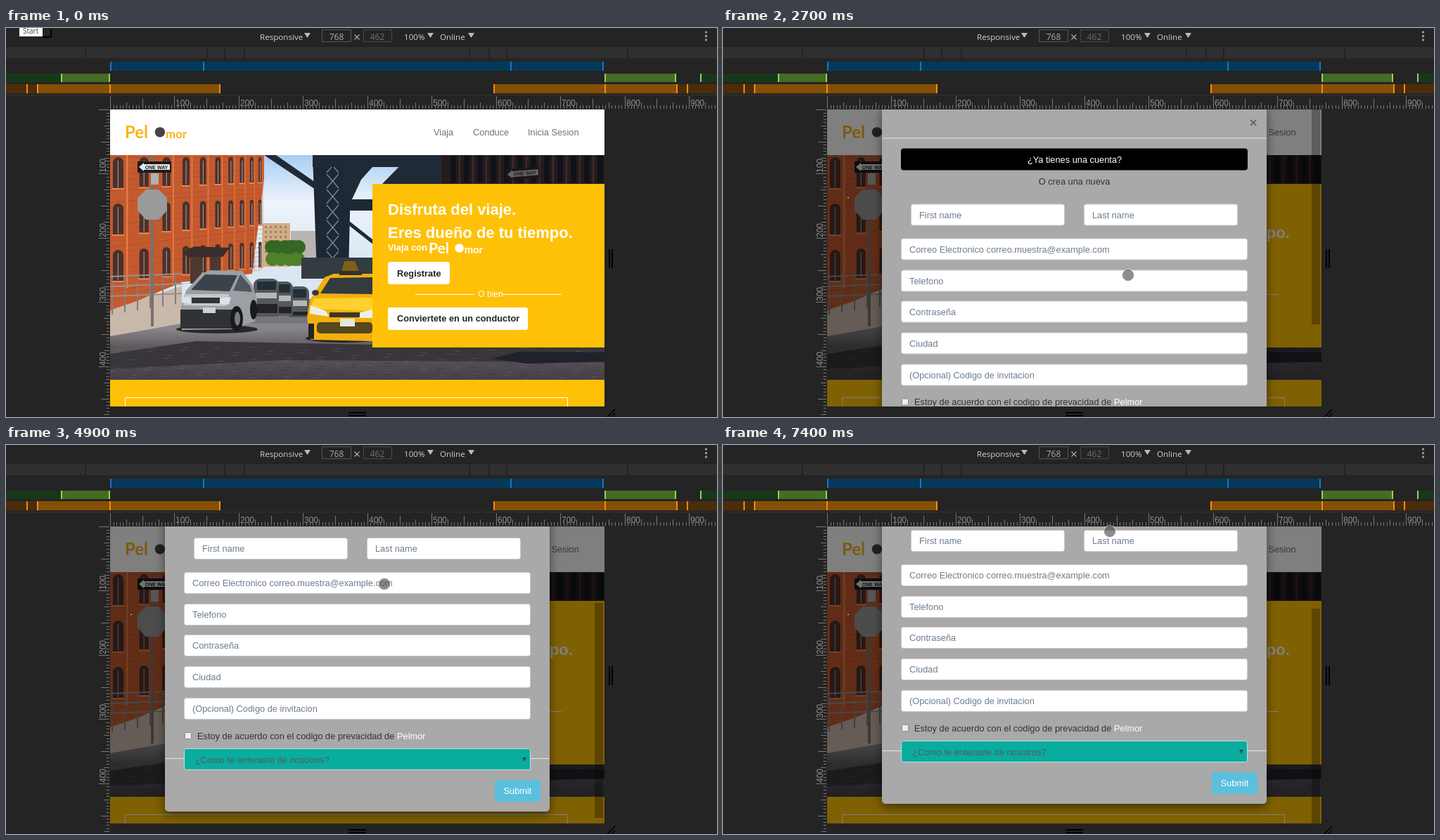
These frames come from a looping animation (1011 px wide and 554 px high, 8 s). An HTML page with a canvas:

```html
<!DOCTYPE html>
<html lang="es">
<head>
<meta charset="utf-8">
<title>Registro</title>
<style>
html, body { margin: 0; width: 1011px; height: 554px; overflow: hidden; background: #242424; }
canvas { display: block; }
</style>
</head>
<body>
<canvas id="stage" width="1011" height="554"></canvas>
<script>
const ctx = document.getElementById('stage').getContext('2d');
const LOOP = 8000, SCALE = 0.9146;
const SANS = '"Liberation Sans", Arial, sans-serif';
const UI = '"Open Sans", "Noto Sans", sans-serif';
const clamp = (v, lo, hi) => Math.min(hi, Math.max(lo, v));

function rect(color, x, y, w, h) {
  ctx.fillStyle = color;
  ctx.fillRect(x, y, w, h);
}
function round(color, x, y, w, h, r, border) {
  ctx.beginPath();
  ctx.roundRect(x, y, w, h, r);
  ctx.fillStyle = color;
  ctx.fill();
  if (border) {
    ctx.strokeStyle = border;
    ctx.lineWidth = 1;
    ctx.stroke();
  }
}
function poly(color, ...p) {
  ctx.beginPath();
  for (let i = 0; i < p.length; i += 2) ctx.lineTo(p[i], p[i + 1]);
  ctx.closePath();
  ctx.fillStyle = color;
  ctx.fill();
}
function line(color, width, ...p) {
  ctx.beginPath();
  for (let i = 0; i < p.length; i += 2) ctx.lineTo(p[i], p[i + 1]);
  ctx.strokeStyle = color;
  ctx.lineWidth = width;
  ctx.stroke();
}
function disc(color, x, y, rx, ry = rx) {
  ctx.beginPath();
  ctx.ellipse(x, y, rx, ry, 0, 0, 7);
  ctx.fillStyle = color;
  ctx.fill();
}
function text(s, x, y, color, font = '12.8px ' + SANS, align = 'left') {
  ctx.font = font;
  ctx.textAlign = align;
  ctx.fillStyle = color;
  ctx.fillText(s, x, y);
}

function toolbar() {
  const font = '12px ' + UI;
  text('Responsive', 361, 17, '#d0d0d0', '11.6px ' + UI);
  text('100%', 566, 17, '#d0d0d0', '11.6px ' + UI);
  text('Online', 617, 17, '#d0d0d0', '11.6px ' + UI);
  for (const x of [424, 599, 657]) poly('#bbb', x, 7, x + 9, 7, x + 4.5, 14);
  round('#242424', 449.5, 2.5, 41, 17, 0, '#555');
  round('#242424', 508.5, 2.5, 40, 17, 0, '#484848');
  text('768', 470, 17, '#aaa', font, 'center');
  text('462', 528, 17, '#707070', font, 'center');
  line('#aaa', 1.2, 495.5, 9.5, 502.5, 16.5);
  line('#aaa', 1.2, 502.5, 9.5, 495.5, 16.5);
  for (const y of [6, 11.5, 17]) disc('#999', 995.5, y, 1.7);
}

function mediaBars() {
  const ticks = (color, y, h, xs) => xs.forEach(x => rect(color, x, y, 2, h));
  rect('#1f1f1f', 0, 25, 1011, 1);
  rect('#2f2f2f', 0, 27, 1011, 16);
  ticks('#222', 27, 16, [112, 285, 310, 338, 658, 686, 711, 883]);
  rect('#05395c', 148, 48, 702, 13);
  ticks('#1976c5', 48, 13, [148, 280, 717, 848]);
  rect('#173819', 0, 65, 78, 12);
  rect('#173819', 988, 65, 23, 12);
  rect('#446c25', 78, 65, 70, 12);
  rect('#446c25', 851, 65, 102, 12);
  ticks('#8fd45c', 65, 12, [78, 146, 851, 951, 987]);
  rect('#4b2d0a', 0, 80, 45, 13);
  rect('#4b2d0a', 955, 80, 56, 13);
  rect('#854f05', 45, 80, 260, 13);
  rect('#854f05', 694, 80, 261, 13);
  ticks('#f58a16', 80, 13, [29, 44, 147, 303, 693, 851, 953, 968]);
  rect('#333', 0, 95, 1011, 1);
}

function rulers() {
  const size = u => u % 100 === 0 ? 18 : u % 50 === 0 ? 14 : u % 25 === 0 ? 9 : 5;
  for (let u = 0; u <= 940; u += 5) {
    const d = Math.round(u * SCALE), n = size(u), x = 148 + d, y = 116 + d;
    rect('#777', x, 115 - n, 1, n);
    if (y < 554) rect('#777', 147 - n * 0.85, y, n * 0.85, 1);
    if (u === 0 || u % 100) continue;
    text(u, x + 2, 111, '#8d8d8d', '12px ' + SANS);
    if (u > 400) continue;
    ctx.save();
    ctx.translate(142, y);
    ctx.rotate(-Math.PI / 2);
    text(u, 1, 0, '#8d8d8d', '12px ' + SANS);
    ctx.restore();
  }
  for (const x of [857, 861]) rect('#000', x, 315, 2, 27);
  for (const y of [547, 551]) rect('#000', 487, y, 25, 2);
  line('#000', 1.5, 855, 554, 866, 543);
  line('#000', 1.5, 861, 554, 866, 549);
}

function wordmark(x, y, size, color, dot) {
  const font = `bold ${size}px Lato, sans-serif`;
  text('Pel', x, y, color, font);
  disc(dot, x + size * 2.08, y - size * 0.36, size * 0.3);
  text('mor', x + size * 2.42, y, color, `bold ${size * 0.7}px Lato, sans-serif`);
}

function oneWay(x, y, w, h, angle, ink, board) {
  ctx.save();
  ctx.translate(x, y);
  ctx.rotate(angle);
  rect(board, -w / 2, -h / 2, w, h);
  poly(ink, -w / 2 + 2, 0, -w / 2 + 9, -6, -w / 2 + 9, -4, w / 2 - 2, -4, w / 2 - 2, 4, -w / 2 + 9, 4, -w / 2 + 9, 6);
  text('ONE WAY', 3, 2.5, board, 'bold 7px ' + SANS, 'center');
  ctx.restore();
}

function building() {
  poly('#c55a2f', 148, 181, 367, 181, 367, 215, 350, 350, 250, 362, 148, 405);
  for (let i = 0; i < 26; i++) line(i % 4 ? '#a9492555' : '#843c2466', 1, 148, 184 + i * 8, 364, 184 + i * 6.4);
  for (let c = 0; c < 10; c++) {
    const k = Math.pow(0.87, c), x = 152 + 290 * (1 - k), w = 15 * k;
    for (let r = 0; r < 3; r++) {
      const y = 184 + r * (58 + 8 * k), h = 32 + 12 * k;
      round('#4a302c', x, y, w, h, [w / 2, w / 2, 0, 0]);
      rect('#a18a7c', x + w * 0.45, y + 5, 1.3, h - 6);
      rect('#e28a59', x - 1, y + h, w + 2, 2);
    }
    rect('#e27d45', x + w + 4 * k, 181, 2.5 * k, 150 + 40 * k);
  }
  poly('#3a2d2b', 252, 318, 268, 311, 318, 313, 308, 326, 258, 327);
  rect('#4b3931', 262, 326, 16, 38);
  rect('#4b3931', 290, 326, 12, 30);
}

function suv() {
  disc('#29292b', 300, 429, 58, 6);
  poly('#9c9fa3', 249, 396, 256, 374, 278, 350, 290, 345, 336, 346, 350, 365, 357, 386, 354, 418, 320, 429, 250, 430);
  poly('#39434c', 263, 373, 283, 351, 329, 352, 318, 375);
  poly('#4d575f', 323, 374, 333, 351, 347, 367, 350, 376);
  poly('#c5c7ca', 255, 379, 317, 379, 313, 396, 252, 395);
  rect('#303338', 264, 384, 40, 8);
  poly('#dde2e6', 250, 383, 262, 383, 263, 393, 250, 391);
  poly('#dde2e6', 304, 385, 320, 383, 317, 394, 304, 393);
  rect('#303236', 248, 401, 74, 27);
  rect('#c9d1da', 280, 398, 18, 8);
  disc('#18191b', 328, 414, 9, 18);
  disc('#777a7e', 329, 414, 4, 10);
  disc('#18191b', 352, 401, 5, 14);
}

function taxi() {
  disc('#242426', 480, 442, 54, 6);
  poly('#f2ae0d', 428, 412, 432, 388, 453, 355, 466, 350, 521, 350, 521, 446, 433, 444);
  poly('#343b3e', 447, 378, 461, 356, 521, 355, 521, 379);
  poly('#ffd02e', 438, 385, 521, 384, 521, 403, 433, 400);
  poly('#806014', 476, 351, 481, 332, 496, 332, 504, 351);
  rect('#31302d', 474, 346, 32, 6);
  poly('#edf0e8', 433, 395, 455, 403, 459, 411, 432, 407);
  poly('#edf0e8', 521, 401, 504, 405, 501, 413, 521, 413);
  rect('#3c3727', 460, 405, 43, 7);
  round('#55471e', 442, 419, 79, 16, 5);
  rect('#e5e6df', 475, 414, 21, 11);
  rect('#242426', 430, 421, 8, 22);
  disc('#343b3e', 440, 377, 5, 4);
}

function photo() {
  ctx.save();
  ctx.beginPath();
  ctx.rect(148, 181, 703, 320);
  ctx.clip();
  const sky = ctx.createLinearGradient(0, 181, 0, 330);
  sky.addColorStop(0, '#a9cdf2');
  sky.addColorStop(0.45, '#edf4fb');
  sky.addColorStop(1, '#dae7f3');
  rect(sky, 148, 181, 703, 220);

  rect('#d1ad86', 365, 278, 39, 62);
  for (let i = 0; i < 30; i++) rect('#9f8068', 368 + i % 5 * 7, 282 + Math.floor(i / 5) * 7, 3, 3);
  rect('#b8b4b0', 405, 289, 42, 50);
  for (let i = 0; i < 11; i++) disc(i % 2 ? '#4f802b' : '#356624', 378 + i * 37 % 43, 312 + i * 17 % 34, 10);

  // Bridge tower with its lattice
  poly('#1e2834', 436, 181, 491, 181, 487, 350, 442, 350);
  for (let y = 186; y < 335; y += 22) {
    line('#718399', 1.5, 456, y, 473, y + 20);
    line('#718399', 1.5, 473, y, 456, y + 20);
  }
  poly('#202a36', 367, 181, 384, 181, 446, 224, 446, 234);
  rect('#202a36', 436, 181, 190, 17);
  poly('#202a36', 480, 198, 521, 198, 505, 216, 491, 246, 480, 246);
  rect('#1e2834', 480, 244, 45, 16);
  line('#202a36', 5, 484, 275, 522, 305);
  rect('#333c41', 420, 327, 110, 30);
  poly('#202a36', 575, 181, 628, 181, 628, 222, 535, 222);
  poly('#241b1d', 619, 181, 851, 181, 851, 222, 619, 222);
  for (let x = 632; x < 846; x += 19) {
    rect('#10121a', x, 182, 8, 38);
    rect('#44292a', x + 12, 181, 2, 41);
  }

  rect('#77777b', 148, 386, 703, 120);
  poly('#c5b4a5', 148, 396, 250, 372, 252, 420, 148, 440);
  building();
  poly('#c9b9ab', 148, 402, 250, 367, 250, 421, 148, 438);
  for (let x = 150; x < 250; x += 18) rect('#817c7a', x, 354, 2, 54 - (x - 150) * 0.16);
  for (const y of [354, 368, 382]) line('#99908c', 2, 148, y, 250, y - 4);

  const road = ctx.createLinearGradient(0, 428, 0, 501);
  road.addColorStop(0, '#89868a');
  road.addColorStop(0.35, '#5f5a5e');
  road.addColorStop(1, '#454046');
  poly(road, 148, 439, 252, 421, 521, 421, 851, 451, 851, 501, 148, 501);
  poly('#38353b', 148, 464, 270, 446, 521, 451, 851, 455, 851, 476, 390, 473, 148, 486);
  for (let i = 0; i < 220; i++) rect(i % 2 ? '#77696b66' : '#28262d66', 148 + i * 97 % 703, 453 + i * 31 % 48, 9, 1);
  poly('#20222b', 690, 471, 729, 461, 851, 462, 851, 475, 740, 478);

  for (const [x, y, w] of [[402, 368, 29], [378, 361, 30], [352, 357, 36]]) {
    round('#54585d', x, y, w, 54 - (x - 352) * 0.2, [9, 9, 2, 2]);
    rect('#242e37', x + 5, y + 4, w - 9, 12);
    rect('#b4b6b7', x + 3, y + 20, w - 6, 8);
    rect('#242426', x + 2, y + 36, w - 4, 13 - (x - 352) * 0.15);
  }
  suv();
  taxi();

  rect('#77706b', 206, 181, 4, 244);
  poly('#999a99', 199, 230, 217, 230, 229, 242, 229, 260, 217, 273, 199, 273, 187, 260, 187, 242);
  rect('#aeb2b2', 206, 207, 11, 16);
  oneWay(211, 198, 48, 16, 0, '#e8e8e5', '#191b20');
  oneWay(735, 207, 48, 16, -0.08, '#686365', '#19171d');
  ctx.restore();
}

function page(pressed) {
  rect('#fff', 148, 116, 703, 65);
  wordmark(169, 157, 24, '#fbb41a', '#444');
  text('Viaja', 608, 153, '#707070');
  text('Conduce', 664, 153, '#707070');
  text('Inicia Sesion', 742, 153, '#707070');
  photo();

  rect('#ffc107', 521, 222, 330, 233);
  text('Disfruta del viaje.', 543, 266, '#fff', 'bold 22px ' + SANS);
  text('Eres dueño de tu tiempo.', 543, 299, '#fff', 'bold 22px ' + SANS);
  text('Viaja con', 543, 317, '#fff', 'bold 12.8px ' + SANS);
  wordmark(601, 321, 21, '#fff', '#fff');
  round('#fff', 543.5, 333.5, 87, 31, 3, pressed ? '#999' : '#fff');
  if (pressed) round('#0000', 545, 335, 84, 28, 2, '#ccc');
  text('Registrate', 556, 354, '#212529', 'bold 12.8px ' + SANS);
  rect('#fff', 582, 379, 84, 1);
  rect('#fff', 706, 379, 84, 1);
  text('O bien', 689, 383, '#fff', '12px ' + SANS, 'center');
  round('#fff', 543, 398, 199, 32, 3);
  text('Conviertete en un conductor', 556, 418, '#212529', 'bold 12.8px ' + SANS);

  rect('#ffc107', 148, 501, 703, 38);
  line('#fff', 1, 169.5, 540, 169.5, 526.5, 798.5, 526.5, 798.5, 540);
}

function field(label, x, y, w) {
  round('#fff', x + 0.5, y + 0.5, w - 1, 30, 3, '#ccc');
  text(label, x + 12, y + 20, '#6c7d8f');
}

function modal(offset, opacity) {
  ctx.save();
  ctx.translate(0, offset);
  ctx.globalAlpha = opacity;
  ctx.shadowColor = 'rgba(0,0,0,.5)';
  ctx.shadowBlur = 14;
  ctx.shadowOffsetY = 4;
  round('#a9a9a9', 226, 145, 547, 528, 5);
  ctx.shadowColor = 'transparent';
  line('#777', 1, 230, 145.5, 769, 145.5);
  rect('#e5e5e5', 226, 189, 547, 1);
  text('×', 754, 173, '#666', 'bold 19px ' + SANS, 'center');
  round('#000', 253, 204, 493, 31, 4);
  text('¿Ya tienes una cuenta?', 500, 224, '#fff', undefined, 'center');
  text('O crea una nueva', 499.5, 255.5, '#333', undefined, 'center');
  field('First name', 267, 283, 219);
  field('Last name', 513, 283, 219);
  ['Correo Electronico correo.muestra@example.com', 'Telefono', 'Contraseña', 'Ciudad',
    '(Opcional) Codigo de invitacion'].forEach((label, i) => field(label, 253, Math.round(331.7 + i * 44.8), 493));
  round('#eee', 254.5, 560.5, 9, 9, 1, '#888');
  text('Estoy de acuerdo con el codigo de prevacidad de ', 272, 569.5, '#333');
  text('Pelmor', 556, 569.5, '#fff');
  rect('#e5e5e5', 226, 597, 547, 1);
  round('#09ad9f', 253.5, 583.5, 492, 30, 3, '#c8e0dd');
  text('¿Como te enteraste de nosotros?', 269, 603.5, '#55595c');
  poly('#444', 734, 596, 740, 596, 737, 602);
  round('#5bc0de', 695, 628, 65, 31, 3);
  text('Submit', 727.5, 648, '#fff', undefined, 'center');
  ctx.restore();
}

// Pointer path: time, x, y
const PATH = [
  [700, 9, 9], [1000, 449, 299], [1300, 449, 299], [1500, 442, 330], [1800, 520, 422],
  [2000, 578, 385], [2100, 576, 352], [3300, 576, 352], [3600, 476, 307], [3700, 476, 307],
  [4100, 535, 359], [4400, 535, 359], [4900, 538, 198], [5100, 540, 185], [5200, 540, 185],
  [6000, 543, 236], [7000, 543, 236], [7400, 550, 123], [LOOP, 550, 123]
];
function pointerAt(t) {
  const i = Math.max(1, PATH.findIndex(p => p[0] >= t));
  const [t0, x0, y0] = PATH[i - 1], [t1, x1, y1] = PATH[i];
  const k = clamp((t - t0) / (t1 - t0), 0, 1);
  return [x0 + (x1 - x0) * k, y0 + (y1 - y0) * k];
}

function draw(t) {
  const [x, y] = pointerAt(t);
  rect('#242424', 0, 0, 1011, 554);
  toolbar();
  mediaBars();
  rulers();

  ctx.save();
  ctx.beginPath();
  ctx.rect(148, 116, 703, 423);
  ctx.clip();
  page(t >= 2500);
  if (t >= 2500) rect(`rgba(0,0,0,${t < 2600 ? 0.09 : 0.5})`, 148, 116, 703, 423);
  if (t >= 2600) {
    // Dragging scrolls the dialog until it reaches either end
    const scroll = t > 4400 ? clamp((t < 5200 ? 349 : 352.5) - y, 0, 162) : 0;
    const k = clamp((t - 2550) / 300, 0, 1);
    rect('#ddd', 177, 241, 2, 1);
    modal(-scroll - 130 * (1 - k) ** 2, Math.min(1, 2 * k));
    rect('rgba(0,0,0,.28)', 837, 116 + scroll * 0.722, 12, 306);
  }
  ctx.restore();

  if (t < 700) rect('#fff', 19, 0, 33, 12);
  if (t < 100) {
    text('Start', 24, 8, '#444', '10px ' + UI);
    rect('#000', 52, 12, 13, 2);
    rect('#000', 63, 2, 2, 12);
  } else if (t >= 700) {
    disc('rgba(70,70,70,.62)', x, y, 8.5);
    ctx.strokeStyle = 'rgba(255,255,255,.6)';
    ctx.lineWidth = 1.2;
    ctx.stroke();
  }
}

const start = performance.now();
function tick() {
  const t = (performance.now() - start) % LOOP;
  draw(Math.floor(t / 100) * 100);
  requestAnimationFrame(tick);
}
tick();
</script>
</body>
</html>
```
